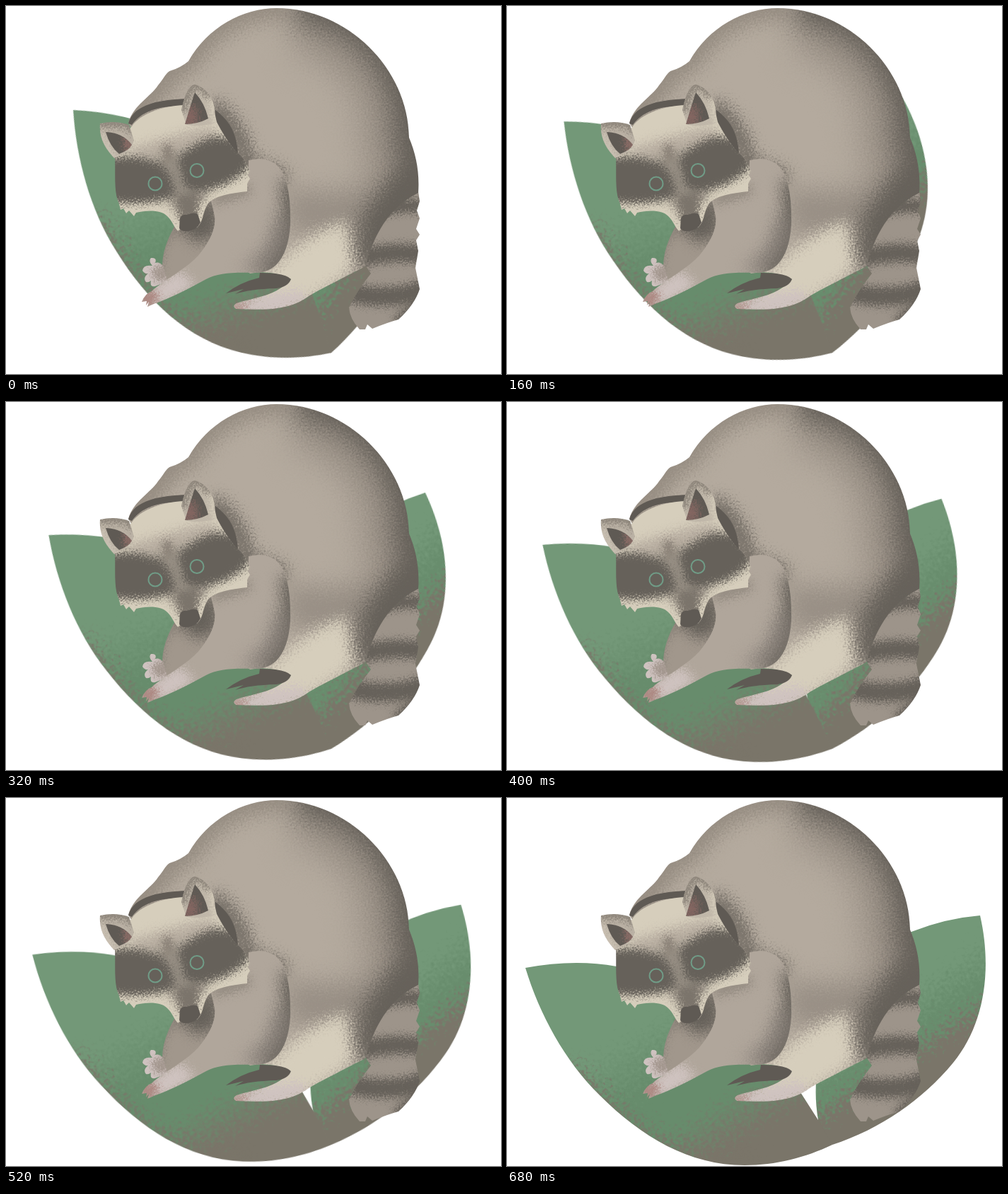
An HTML page for the animation above (1.92 s loop, 700 by 520 pixels).

```html
<!DOCTYPE html>
<html lang="en">
<head>
<meta charset="utf-8">
<title>Raccoon</title>
<style>
html, body { margin: 0; width: 100%; height: 100%; overflow: hidden; background: #fff; }
#stage { position: fixed; inset: 0; overflow: hidden; contain: strict; }
svg { position: absolute; left: 0; top: 0; width: 700px; height: 520px; overflow: hidden; }
.leaf { transform-origin: 460px 490px; overflow: visible; }
.leaf, #animal { will-change: transform; }
</style>
</head>
<body>
<div id="stage">
<svg>
  <defs id="filters"></defs>
  <defs>
    <linearGradient id="leftTone" gradientUnits="userSpaceOnUse" x1="191" y1="328" x2="302" y2="518">
      <stop offset="0" stop-color="#739878"/><stop offset=".35" stop-color="#678c6c"/>
      <stop offset=".65" stop-color="#678c6c"/><stop offset=".92" stop-color="#7a7569"/>
    </linearGradient>
    <linearGradient id="rightTone" gradientUnits="userSpaceOnUse" x1="300" y1="449" x2="366" y2="549">
      <stop offset="0" stop-color="#739878"/><stop offset=".42" stop-color="#688d6d"/>
      <stop offset=".52" stop-color="#688d6d"/><stop offset=".74" stop-color="#7a7569"/>
    </linearGradient>
  </defs>
</svg>
<svg class="leaf" id="right"></svg>
<svg class="leaf" id="left"></svg>
<svg id="animal"></svg>
</div>
<script>
const dark = '#66615a', black = '#5f5a54', fur = '#b4aa9e', cream = '#d6cebc', pink = '#cfc3c0', rose = '#ad8983';
const $ = id => document.getElementById(id);
let count = 0;

// Scatters soft shading into speckles of a given size and spread
const speckle = (id, frequency, spread) =>
  `<filter id="${id}" filterUnits="userSpaceOnUse" x="-60" y="-60" width="820" height="640" color-interpolation-filters="sRGB">
    <feTurbulence type="fractalNoise" baseFrequency="${frequency}" numOctaves="2" seed="4" result="n"/>
    <feDisplacementMap in="SourceGraphic" in2="n" scale="${spread}" xChannelSelector="R" yChannelSelector="G"/></filter>`;
$('filters').innerHTML = speckle('grain', .4, 38) + speckle('fine', .45, 24) + speckle('mottle', .2, 85);

// Soft fill, or soft line when a width is given
const soft = (d, color, blur, width = 0) =>
  `<path d="${d}" fill="${width ? 'none' : color}" ${width ? `stroke="${color}" stroke-width="${width}"` : ''} style="filter:blur(${blur}px)"/>`;

const flat = (d, color) => `<path d="${d}" fill="${color}"/>`;

// Crisp outline filled with speckled shading
function part(outline, base, shades = [], filter = 'fine') {
  const id = 'clip' + count++;
  return `<clipPath id="${id}"><path d="${outline}"/></clipPath><g clip-path="url(#${id})"><g filter="url(#${filter})">
    <rect x="-60" y="-60" width="820" height="640" fill="${base}"/>${shades.map(s => soft(...s)).join('')}</g></g>`;
}

$('right').innerHTML = part(
  'M669 166C687 245 674 322 631 374C588 426 528 468 460 490L430 469L440 455C436 430 435 405 440 380C455 300 510 210 572 189Q620 170 669 166Z',
  'url(#rightTone)', [], 'mottle');

$('left').innerHTML = part(
  'M26 240C46 306 82 372 131 420C190 479 258 519 336 519C380 519 422 508 460 490L440 455L417 419C370 340 280 262 155 238Q95 227 26 240Z',
  'url(#leftTone)', [['M85 385Q105 410 131 430C190 489 258 525 336 525', '#7a7569', 8, 20]], 'mottle');

const tail = part(
  'M583 262L585 276L581 289L585 300L580 315L585 323L580 331L583 346L579 370L585 400Q578 422 555 443Q540 447 518 456L511 450L508 457L500 457Q486 442 485 426Q498 400 516 378L508 366Q520 300 583 262Z',
  '#9d948a', [
    ['M515 293Q555 278 595 284', dark, 4, 19],
    ['M500 357Q540 344 595 352', dark, 5, 26],
    ['M485 404Q530 418 595 402', dark, 5, 27],
    ['M592 390L588 425L555 452', dark, 6, 26],
  ]);

const rim = 'M410 -8C510 -8 588 90 580 190C602 240 585 290 560 330';
const body = part(
  'M173 165C180 140 205 128 215 112C224 102 226 93 234 91Q247 87 258 78C285 30 335 3 383 3C482 3 569 88 570 186C580 210 585 235 583 264C540 285 520 325 508 368C475 385 445 400 428 410C402 430 365 430 325 428Q319 424 326 420C350 411 380 412 403 386Q375 372 345 378L250 300Z',
  fur, [
    ['M170 165L232 88L258 72C285 25 335 -3 400 -3', '#958c81', 12, 40],
    [rim, '#958c82', 24, 150],
    [rim, dark, 16, 66],
    ['M395 255Q445 270 540 250L500 330L400 320Z', '#988f85', 16],
    ['M590 215L545 240L500 295L490 365L520 375L590 290Z', dark, 13],
    ['M480 304C440 318 405 340 355 393L365 425L430 415L490 372Z', cream, 8],
    ['M290 140Q335 175 338 222L395 245', '#716b63', 9, 24],
    ['M316 424L375 405L415 402L432 414L380 434L320 434Z', pink, 5],
    ['M312 426L338 418L340 430L315 434Z', rose, 4],
  ], 'grain');

const shadow = flat('M311 406Q332 390 358 384L359 377Q395 377 403 386Q399 397 382 399Q345 400 324 407L336 400Z', black);

const farArm = part(
  'M238 312Q221 342 221 368L224 392Q245 382 264 362Q295 338 296 300L290 275L250 290Z',
  '#a1978c', [
    ['M230 305L300 270L298 325L270 335Z', dark, 9],
    ['M215 380L220 340L240 312', '#8d857b', 5, 10],
  ]);

const farHand = part(
  'M222 367Q217 361 211 363Q214 355 205 356Q201 360 207 367Q194 365 193 374Q196 379 201 378Q193 384 198 390Q202 391 205 388Q203 398 211 396Q219 393 228 388Z',
  pink, [['M206 372L228 362L230 390L210 388Z', '#a1958c', 4]]);

const nearArm = part(
  'M343 218Q379 209 393 239Q403 262 402 310C399 350 385 375 355 377C320 376 300 377 283 386C257 400 230 414 209 421L200 425L202 418L198 423L199 417L192 418Q197 406 206 403C220 389 257 371 274 350Q298 320 295 297L290 270L342 255Z',
  '#b0a69b', [
    ['M402 245C412 290 400 355 365 378', dark, 10, 30],
    ['M340 375Q385 360 392 300', '#89817a', 12, 18],
    ['M292 275L345 258', '#8a8278', 7, 12],
    ['M200 402L245 374L268 394L215 426Z', pink, 7],
    ['M185 408L207 400L218 412L198 430Z', rose, 4],
  ]);

const neck = flat('M173 166C180 138 220 132 256 131L252 142C215 140 190 150 178 168Z', black)
  + flat('M296 147C318 163 327 183 328 210L296 175Z', black);

const head = part(
  'M154 212C155 240 152 262 160 280L162 288L166 286L170 293L174 289L181 297L184 292C200 288 220 288 228 297C235 303 237 312 243 318L248 314L270 313C279 306 278 292 284 282C290 270 312 265 341 262L341 251L345 244L342 239L345 233Q338 216 327 207C312 190 302 172 296 160L270 140C225 138 190 152 178 170L150 200Z',
  cream, [
    ['M165 205L212 190L275 172L300 172L295 200L190 222Z', '#b9afa2', 7],
    ['M205 215L270 200L285 270L268 300L245 295L225 270Z', '#989085', 7],
    ['M140 216Q185 206 220 224Q240 245 238 268Q200 286 140 276Z', dark, 5],
    ['M243 216Q266 192 296 184L320 186L350 212L340 232Q325 246 310 252Q272 270 252 254Z', dark, 5],
    ['M227 196L231 220', '#8a8177', 4, 14],
    ['M240 268L270 262L273 302L246 302Z', '#7b746b', 5],
    ['M155 291L182 288L225 291L241 319', cream, 3, 8],
    ['M275 318L279 286Q310 264 346 252', cream, 3, 10],
  ]);

const ears = part(
  'M133 166Q155 161 174 168L181 190Q175 207 153 215C142 203 131 188 133 166Z',
  '#bbb2a5', [
    ['M130 164L178 166L180 180', '#8a8278', 4, 13],
    ['M135 180Q140 200 155 216', '#d0c7b9', 3, 6],
  ]) + part(
  'M141 178Q165 179 178 196Q174 204 160 209Q147 199 141 178Z',
  black, [['M168 182L182 190L178 206L168 202Z', '#94706a', 4]]
  ) + part(
  'M248 147C252 128 258 112 267 111C282 114 296 132 295 150L298 164Q285 171 255 168Z',
  '#c0b7a9', [
    ['M249 150Q254 118 267 108Q282 112 290 128', '#888076', 4, 13],
    ['M294 130L298 170', cream, 4, 10],
  ]) + part(
  'M267 122Q281 137 286 159Q271 167 253 167Q260 143 267 122Z',
  black, [['M250 145L268 140L272 166L250 172Z', '#846661', 5]]);

const nose = flat('M246 300Q248 294 256 295Q265 291 271 294L275 306Q270 316 258 318Q247 319 245 314Z', black);

const eyes = [[211, 251], [270, 232.5]].map(([x, y]) =>
  `<circle cx="${x}" cy="${y}" r="9.5" fill="${dark}" stroke="#709c87" stroke-width="2"/>`).join('');

$('animal').innerHTML = tail + body + shadow + farArm + farHand + nearArm + neck + head + ears + nose + eyes;

// The two leaves fan out around a shared pivot, in 40 ms steps, then rest
function draw() {
  const time = Math.floor(performance.now() % 1920 / 40) * 40;
  const u = Math.min(time / 680, 1);
  const rest = 1 - (.5 * u + 1.5 * u * u - u * u * u);
  $('left').style.transform = `rotate(${13.28 * rest}deg)`;
  $('right').style.transform = `rotate(${-23.6 * rest}deg)`;
  requestAnimationFrame(draw);
}
draw();
</script>
</body>
</html>
```
